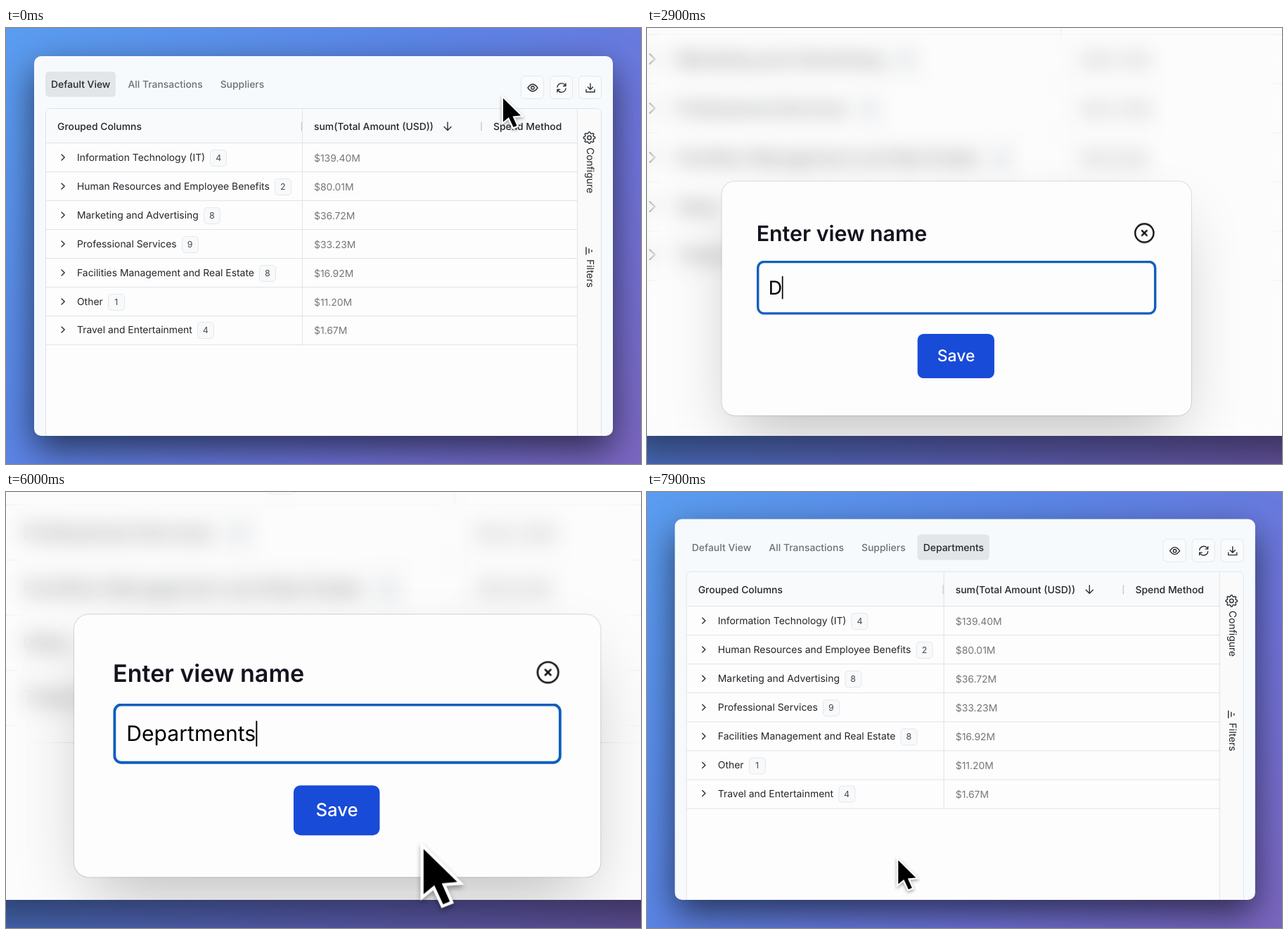
These frames come from a looping animation (903 px wide and 620 px high, 8 s). An HTML page:

```html
<!DOCTYPE html>
<html lang="en">
<head>
<meta charset="utf-8">
<title>Create a view</title>
<style>
  html, body { margin: 0; width: 100%; height: 100%; overflow: hidden; }
  body {
    position: relative;
    background: linear-gradient(135deg, #5a9df0, #5b85e6 40%, #6f74da 70%, #7b66c0);
    font: 400 13.9px/1 Inter, sans-serif;
    font-optical-sizing: none;
    text-rendering: geometricPrecision;
    color: #22262b;
    white-space: nowrap;
  }
  div, svg { position: absolute; box-sizing: border-box; }
  svg { overflow: visible; fill: none; stroke: #2b2f34; stroke-width: 1.4; stroke-linecap: round; stroke-linejoin: round; }
  [hidden] { display: none !important; }
  #camera { left: 0; top: 0; width: 903px; height: 620px; transform-origin: 185px 580px; }
  #window {
    left: 40px; top: 40px; width: 823px; height: 540px; border-radius: 10px; overflow: hidden;
    background: #f6fafd; box-shadow: 0 20px 50px rgba(0, 0, 0, .6);
  }
  #page { left: -40px; top: -40px; width: 903px; height: 620px; }

  #tabs { left: 56px; top: 62px; display: flex; gap: 9px; }
  #tabs span { padding: 2px 8px 0; border-radius: 5px; line-height: 34px; font-weight: 500; color: #6d7276; }
  #tabs .on { background: #e2e6e9; color: #24292f; }
  .icon { top: 68px; width: 33px; height: 33px; border: 1px solid #e6e9ec; border-radius: 6px; background: #f9fbfc; }
  .icon svg { left: 7.5px; top: 7.5px; }

  #table { left: 56px; top: 114px; width: 791px; height: 500px; border: 1px solid #e0e3e5; border-radius: 7px; background: #fdfdfd; overflow: hidden; }
  #head { left: 0; top: 0; width: 100%; height: 48.6px; background: #f9fafb; }
  #side { right: 0; top: 0; width: 34px; height: 100%; background: #fafafa; border-left: 1px solid #e0e3e5; }
  .line { background: #e0e3e5; }
  .th { top: 129px; line-height: 24px; font-weight: 500; }
  .cell { line-height: 42px; }
  .cell b {
    display: inline-block; min-width: 24px; margin-left: 7px; box-sizing: border-box; border: 1px solid #e4e7eb;
    border-radius: 5px; background: #f8f9fb; font: 400 12.4px/22px Inter, sans-serif; color: #44494f; text-align: center;
  }
  .value { color: #74777a; }
  .side { left: 821px; width: 17px; writing-mode: vertical-rl; line-height: 17px; }

  #menu { left: 669px; top: 108.5px; width: 160px; height: 116px; border: 1px solid #e8eaec; border-radius: 6px; background: #fff; box-shadow: 0 3px 8px rgba(0, 0, 0, .13); }
  #menu div { left: 4px; width: 150px; height: 32px; padding-left: 8px; line-height: 34px; border-radius: 4px; color: #111; }

  #veil { inset: 0; background: rgba(252, 252, 252, .28); backdrop-filter: blur(8px); }
  #modal {
    left: 99px; top: 328.4px; width: 391px; height: 195px; border-radius: 11px;
    background: #fdfdfd; box-shadow: 0 25px 50px -12px rgba(0, 0, 0, .25), 0 0 0 .6px rgba(0, 0, 0, .12);
  }
  #title { left: 28.8px; top: 32.6px; font-size: 17.8px; line-height: 24px; font-weight: 600; color: #14141f; }
  #close { left: 351.6px; top: 43px; stroke: #111; }
  #input {
    left: 28.8px; top: 65.8px; width: 333.3px; height: 44.4px; padding-left: 8px; border: 2px solid #0f5fbe; border-radius: 6px;
    display: flex; align-items: center; font-size: 15.75px; color: #000;
  }
  #input.blurred { border: 1px solid #e3e6ea; padding-left: 9px; }
  #caret { width: 1px; height: 18.6px; background: #000; }
  #save { left: 163px; top: 126.4px; width: 64.3px; height: 37.1px; border-radius: 5px; background: #184bd8; color: #fff; font-size: 13.4px; font-weight: 500; line-height: 39.6px; text-align: center; }
  #cursor { left: 0; top: 0; filter: drop-shadow(0 2px 2px rgba(0, 0, 0, .35)); }
  #cursor path { fill: #000; stroke: #fff; stroke-width: 4.6; stroke-linejoin: miter; paint-order: stroke; }
</style>
</head>
<body>
<div id="camera">
  <div id="window">
    <div id="page">
      <div id="tabs"><span>Default View</span><span>All Transactions</span><span>Suppliers</span><span>Departments</span></div>
      <div class="icon" style="left:732px"><svg width="16" height="16"><path d="M1 8Q8-2 15 8Q8 18 1 8Z"/><circle cx="8" cy="8" r="2.2"/></svg></div>
      <div class="icon" style="left:773px"><svg width="16" height="16"><path d="M2 7A6.2 6.2 0 0 1 13 4L14 5.5M14 2V5.5H10.5M14 9A6.2 6.2 0 0 1 3 12L2 10.5M2 14V10.5H5.5"/></svg></div>
      <div class="icon" style="left:814px"><svg width="16" height="16"><path d="M8 2V10.5M4.5 7L8 10.5L11.5 7M2 10.5V14H14V10.5"/></svg></div>

      <div id="table"><div id="head"></div><div id="side"></div></div>
      <div class="th" style="left:73px">Grouped Columns</div>
      <div class="th" style="left:438px">sum(Total Amount (USD))</div>
      <div class="th" style="left:693px">Spend Method</div>
      <svg><path d="M628 134V145M623 140.5L628 145.5L633 140.5"/><path style="stroke:#c6cacd" d="M420.5 134V146M676 134V146"/></svg>
      <div class="line" style="left:421px;top:115px;width:1px;height:335px"></div>
      <div id="rows"></div>

      <svg id="gear"></svg>
      <div class="side" style="top:170px">Configure</div>
      <svg><path d="M825 312V322M829 314V320M833 316V318"/></svg>
      <div class="side" style="top:329px">Filters</div>

      <div id="menu">
        <div style="top:4px;color:#8f9194">Update current view</div>
        <div style="top:36.5px;background:#f3f4f5">Create new view</div>
        <div class="line" style="left:0;top:73px;width:158px;height:1px"></div>
        <div style="top:78.5px">Edit views</div>
      </div>
    </div>
    <div id="veil"></div>
    <div id="modal">
      <div id="title">Enter view name</div>
      <svg id="close"><circle r="7.7"/><path d="M-2-2L2 2M2-2L-2 2"/></svg>
      <div id="input"><span id="typed"></span><span id="caret"></span></div>
      <div id="save">Save</div>
    </div>
  </div>
  <svg id="cursor"><path d="M2 4V37.5L10 31L16.5 45L21.5 43L15.5 29.5L27 28.5Z"/></svg>
</div>
<script>
const $ = id => document.getElementById(id);
const clamp = x => Math.min(1, Math.max(0, x));
const smooth = x => x * x * (3 - 2 * x);

const groups = [
  ['Information Technology (IT)', 4, '139.40'],
  ['Human Resources and Employee Benefits', 2, '80.01'],
  ['Marketing and Advertising', 8, '36.72'],
  ['Professional Services', 9, '33.23'],
  ['Facilities Management and Real Estate', 8, '16.92'],
  ['Other', 1, '11.20'],
  ['Travel and Entertainment', 4, '1.67'],
];
const rule = y => `<div class="line" style="left:57px;top:${y}px;width:756px;height:1px"></div>`;
$('rows').innerHTML = rule(163.2) + groups.map(([name, count, sum], i) => {
  const top = 164 + 40.9 * i;
  return rule(top + 40.1) +
    `<svg style="left:81px;top:${top + 20}px"><path d="M-2-4L2.2 0L-2 4"/></svg>
     <div class="cell" style="left:101px;top:${top}px">${name}<b>${count}</b></div>
     <div class="cell value" style="left:438px;top:${top + 1}px">$${sum}M</div>`;
}).join('');

// Eight-toothed outline for the settings icon
const teeth = Array.from({ length: 32 }, (_, i) => {
  const a = (i - .5) * Math.PI / 16, r = i % 4 < 2 ? 8.2 : 6.3;
  return `${829.5 + r * Math.cos(a)},${156 + r * Math.sin(a)}`;
}).join(' ');
$('gear').innerHTML = `<polygon points="${teeth}"/><circle cx="829.5" cy="156" r="2.7"/>`;

// Critically damped spring from 0 to 1
const spring = t => t <= 0 ? 0 : 1 - (1 + 6 * t) * Math.exp(-6 * t);

// Pointer stops: seconds, x, y
const stops = [
  [0, 705, 96], [.5, 748, 86], [1.25, 748, 86], [1.8, 741, 155], [5.45, 741, 155],
  [6, 396.6, 538.2], [6.45, 354.8, 520], [8, 354.8, 520],
];
function pointer(t) {
  const i = stops.findIndex(s => s[0] > t);
  const [t0, x0, y0] = stops[i - 1], [t1, x1, y1] = stops[i];
  const p = smooth((t - t0) / (t1 - t0));
  return [x0 + (x1 - x0) * p, y0 + (y1 - y0) * p];
}

const TYPE_START = 2.85, TYPE_STEP = .17, TYPE_END = 4.55, BLINK = .53;

function draw(t) {
  const zoom = 1 + .914 * (spring(t - 2.43) - spring(t - 6.567));
  $('camera').style.transform = `scale(${zoom})`;

  const [x, y] = pointer(t);
  $('cursor').style.transform = `translate(${x}px, ${y}px)`;

  const saved = t >= 7;
  [...$('tabs').children].forEach((tab, i) => {
    tab.className = i === (saved ? 3 : 0) ? 'on' : '';
    tab.hidden = i === 3 && !saved;
  });
  $('menu').hidden = t < .95 || t > 2.15;

  const opening = clamp((t - 2.15) / .2), closing = clamp((t - 6.75) / .2);
  $('veil').hidden = $('modal').hidden = opening === 0 || closing === 1;
  $('veil').style.opacity = opening - closing;
  $('modal').style.opacity = opening - closing ** 1.5;
  $('modal').style.transform = `scale(${.95 + .05 * (opening - closing)})`;

  const letters = t < TYPE_START ? 0 : Math.floor((t - TYPE_START) / TYPE_STEP + 1e-6) + 1;
  $('typed').textContent = 'Departments'.slice(0, letters);
  const focused = t < 6.62;
  $('input').className = focused ? '' : 'blurred';
  const caretOn = t < TYPE_END || Math.floor((t - TYPE_END) / BLINK) % 2 === 0;
  $('caret').style.opacity = focused && caretOn ? 1 : 0;
  $('save').style.opacity = t > 6.35 ? .9 : 1;
}

function tick() {
  draw(performance.now() % 8000 / 1000);
  requestAnimationFrame(tick);
}
tick();
</script>
</body>
</html>
```
